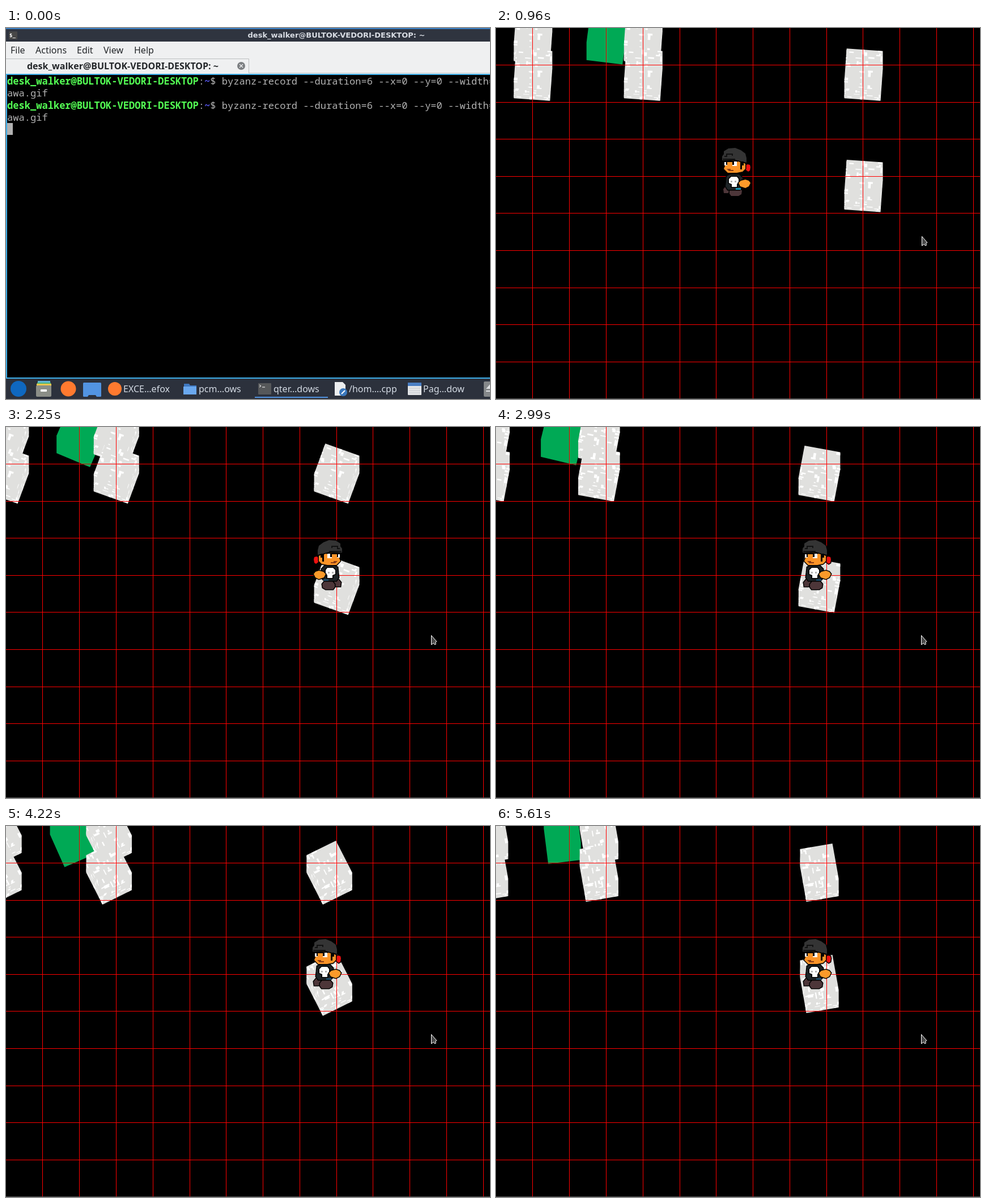
An HTML page with a canvas for the animation above (5630 ms loop, 854 by 656 pixels).

```html
<!DOCTYPE html>
<html lang="en">
<head>
<meta charset="utf-8">
<title>Terminal and tile game</title>
<style>
  html, body { margin: 0; width: 100%; height: 100%; overflow: hidden; background: #000; }
  svg, canvas { position: absolute; left: 0; top: 0; display: block; }
  text { white-space: pre; }
  .ui { font: 16px "Noto Sans", "Open Sans", sans-serif; }
  .mono { font: 17.07px "Noto Sans Mono", "DejaVu Sans Mono", monospace; fill: #b2b2b2; }
  .user { font-weight: 700; fill: #54ff54; }
  .path { font-weight: 700; fill: #5c5cff; }
</style>
</head>
<body>
<svg id="term" width="854" height="656" viewBox="0 0 854 656">
  <rect width="854" height="25" fill="#2f343f"/>
  <rect width="854" height="2" fill="#3b7fc4"/>
  <rect x="5" y="6" width="15" height="14" rx="1" fill="#474747"/>
  <text x="6" y="16" font-size="9" font-weight="700" font-family="DejaVu Sans Mono, monospace" fill="#fff">$_</text>
  <text x="583" y="17" text-anchor="middle" font-size="13" font-weight="700" font-family="DejaVu Sans, sans-serif" fill="#d8dce3">desk_walker@BULTOK-VEDORI-DESKTOP: ~</text>
  <rect y="24" width="854" height="58" fill="#eff0f1"/>
  <g class="ui" fill="#232629">
    <text x="8" y="45">File</text>
    <text x="52" y="45">Actions</text>
    <text x="125" y="45">Edit</text>
    <text x="172" y="45">View</text>
    <text x="226" y="45">Help</text>
  </g>
  <path id="keys" d="M9 47.5h8M52 47.5h10M126 47.5h8M172 47.5h9M227 47.5h10" stroke="#232629"/>
  <path d="M428.5 80V54.5H0" fill="none" stroke="#bcbebf"/>
  <path d="M429 79.5H854" stroke="#c8cacb"/>
  <text class="ui" x="206" y="73" text-anchor="middle" style="font-weight:700" fill="#232629">desk_walker@BULTOK-VEDORI-DESKTOP: ~</text>
  <circle cx="415" cy="67" r="7" fill="#7b7e81"/>
  <path d="M412 64l6 6m0-6l-6 6" stroke="#eff0f1" stroke-width="1.4"/>
  <rect y="81" width="854" height="539" fill="#3daee9"/>
  <rect x="2" y="83" width="852" height="535" fill="#000"/>
  <g id="lines" class="mono"></g>
  <rect x="2" y="168" width="10" height="21" fill="#b2b2b2"/>
</svg>

<canvas id="game" width="854" height="656"></canvas>

<svg id="bar" width="854" height="656" viewBox="0 0 854 656">
  <rect y="620" width="854" height="36" fill="#2c313c"/>
  <rect id="active" x="439" y="652" width="129" height="2" fill="#5294e2"/>
  <circle cx="22" cy="638" r="14" fill="#0f68c0"/>
  <path d="M55 627h24v6H55z" fill="#4fb477"/>
  <path d="M56 624h22v3H56z" fill="#61b8d8"/>
  <path d="M54 629h26v4H54z" fill="#f0c84c"/>
  <rect x="53" y="632" width="27" height="20" rx="2" fill="#8b8e87"/>
  <rect x="61" y="639" width="11" height="4" rx="1" fill="#fff"/>
  <circle cx="110" cy="638" r="13.5" fill="#ff7a2f"/>
  <rect x="136" y="627" width="32" height="25" rx="1.5" fill="#5294e2"/>
  <path d="M144 652l2-3h12l2 3z" fill="#2c313c"/>
  <circle cx="192" cy="638" r="12" fill="#ff7a2f"/>
  <path d="M314 629h9l2 3h11v16h-22z" fill="#3f78c0"/>
  <path d="M313 634h23v14h-23z" fill="#6aa8ee"/>
  <rect x="445" y="628" width="23" height="20" rx="1" fill="#56585a"/>
  <path d="M447 631l3 2-3 2m5 0h5" fill="none" stroke="#fff"/>
  <path d="M580 626h14l5 5v19h-19z" fill="#eceeef"/>
  <circle cx="595" cy="644" r="7" fill="#3a78bd"/>
  <path d="M592 647l6-6" stroke="#fff" stroke-width="2"/>
  <rect x="709" y="627" width="24" height="22" rx="1" fill="#e4e6e8"/>
  <path d="M709 627h24v6h-24z" fill="#4a7fc4"/>
  <path d="M711 637h20m-20 4h20m-20 4h20" stroke="#c3c8cd"/>
  <rect x="843" y="625" width="14" height="27" rx="2" fill="#85888a"/>
  <path d="M847 638l7-8v8zm0 3h7v2h-7z" fill="#dfe1e3"/>
  <g class="ui" fill="#d3dae3">
    <text x="207" y="644">EXCE…efox</text>
    <text x="340" y="644">pcm…ows</text>
    <text x="472" y="644">qter…dows</text>
    <text x="605" y="644">/hom….cpp</text>
    <text x="736" y="644">Pag…dow</text>
  </g>
</svg>

<script>
const LOOP = 5630;
const $ = id => document.getElementById(id);
const ctx = $('game').getContext('2d');

const prompt = y => `<text x="2" y="${y}"><tspan class="user">desk_walker@BULTOK-VEDORI-DESKTOP</tspan>:` +
  `<tspan class="path">~</tspan>$ byzanz-record --duration=6 --x=0 --y=0 --width=</text>` +
  `<text x="2" y="${y + 21}">awa.gif</text>`;
$('lines').innerHTML = prompt(100) + prompt(142.5);

// Refresh times: [first, last, count]
const REFRESH = [[70, 70, 1], [290, 290, 1], [410, 410, 1], [510, 780, 4], [870, 1390, 7],
  [1480, 1990, 7], [2080, 2580, 7], [2670, 3230, 8], [3310, 3800, 7], [3880, 4380, 7],
  [4460, 4860, 6], [5030, 5530, 7], [5610, 5610, 1]];
const TICKS = REFRESH.flatMap(([a, b, n]) =>
  Array.from({ length: n }, (_, i) => Math.round((a + (b - a) * i / Math.max(1, n - 1)) / 10) * 10));

// Motion keys: [time, value]
const SPIN = [[290, 10], [410, -23], [1480, -320.5], [2250, -520], [3720, -896.4], [4700, -1137], [5610, -1360]];
const SCROLL = [[1700, 0], [1990, 65], [2340, 65], [2420, 78]];
const HERO_X = [[1000, 420], [1480, 525], [1700, 572], [2420, 572], [2500, 562]];
const HERO_Y = [[1000, 212], [1480, 211], [1700, 211], [1780, 200]];

function track(keys, t) {
  if (t <= keys[0][0]) return keys[0][1];
  for (let i = 1; i < keys.length; i++) {
    const [a, va] = keys[i - 1], [b, vb] = keys[i];
    if (t <= b) return va + (vb - va) * (t - a) / (b - a);
  }
  return keys[keys.length - 1][1];
}

// Grid
const CELL_W = 64.79, CELL_H = 65.58;
function grid() {
  ctx.fillStyle = '#f00';
  for (let k = 1; k < 10; k++) ctx.fillRect(0, Math.floor(k * CELL_H), 854, 1);
  for (let k = 1; k < 14; k++) ctx.fillRect(Math.floor(k * CELL_W + 0.06), 0, 1, 656);
  ctx.fillStyle = '#555';
  ctx.fillRect(0, 655, 854, 1);
}

// Blocks
let seed = 11;
const rnd = () => (seed = seed * 16807 % 2147483647) / 2147483647;
const SPECKS = Array.from({ length: 26 }, () => {
  const long = 0.05 + rnd() * 0.14, thin = 0.03 + rnd() * 0.05;
  return rnd() < 0.65 ? [rnd(), rnd(), long, thin] : [rnd(), rnd(), thin, long];
});
const LONG = 64, WIDE = 58, TALL = 31, TILT = 0.985;
// Column, row, green
const BLOCKS = [[0, -1], [3, 0, true], [1, 0], [4, 0], [1, 1], [4, 1], [10, 1], [10, 4]];

function specks(ux, uy, vx, vy, x, y) {
  ctx.save();
  ctx.transform(ux, uy, vx, vy, x, y);
  for (const s of SPECKS) ctx.fillRect(...s);
  ctx.restore();
}

function block(x, y, deg, green) {
  const a = deg * Math.PI / 180, cos = Math.cos(a), sin = Math.sin(a);
  const u = [LONG * cos, TILT * LONG * sin], v = [-WIDE * sin, TILT * WIDE * cos];
  const top = [[-1, -1], [1, -1], [1, 1], [-1, 1]].map(([p, q]) =>
    [x + (p * u[0] + q * v[0]) / 2, y - TALL / 2 + (p * u[1] + q * v[1]) / 2]);
  let left = 0;
  top.forEach((c, i) => { if (c[0] < top[left][0]) left = i; });
  const c = top.map((_, i) => top[(left + i) % 4]);
  const low = p => [p[0], p[1] + TALL];
  const hull = [c[0], c[1], c[2], low(c[2]), low(c[3]), low(c[0])];

  ctx.save();
  ctx.beginPath();
  hull.forEach(p => ctx.lineTo(...p));
  ctx.closePath();
  ctx.fillStyle = green ? '#00a955' : '#e0e0de';
  ctx.fill();
  if (!green) {
    ctx.clip();
    ctx.fillStyle = '#fff';
    specks(...u, ...v, ...top[0]);
    for (const [p, q] of [[c[2], c[3]], [c[3], c[0]]])
      specks(q[0] - p[0], q[1] - p[1], 0, TALL, ...p);
  }
  ctx.restore();
}

// Hero, facing left
const shape = ([color, d]) => [color, new Path2D(d)];
const LEGS = [
  ['#4d3639', 'M3 75l4-5h8v10l-4 2h-7z'],
  ['#4d3639', 'M14 78l4-5h14l4 5-1 6-5 3H17l-3-4z']
].map(shape);
const TORSO = [
  ['#1d2326', 'M9 48l6-3h16l6 6v16l-5 5H11l-4-6 1-8z'],
  ['#fff', 'M13 53l4-4h10l3 4v6l-3 3v5h-9v-5l-5-2z'],
  ['#fb9a2a', 'M30 60l4-4 8-2 6 2 3 4-3 6-6 3-9-3z']
].map(shape);
const HEAD = [
  ['#ee1111', 'M42 31l4-2 4 1 1 4-1 6-3 2-5-4z'],
  ['#fb9428', 'M5 25l16-3 15 3 6 3v9l-5 5-10 2H11l-7-7 2-5z'],
  ['#343434', 'M1 22v-7l3-4V6l8-5 12-1 10 4 8 6 2 8v8l-9-2-11-3z']
].map(shape);
const FACE = [
  ['#000', 'M33 24h6v7h-3v7h-3zM5 23h23v2H5z'],
  ['#fff', 'M5 25h5v6H5zM19 24h8v8h-8z'],
  ['#000', 'M8 25h2v5H8zM19 24h3v6h-3z'],
  ['#8c3d16', 'M9 37h7v2h5v2H13z'],
  ['#111', 'M5 14h3v-4h12v4h-2v-2H10v4H5zM2 19h22v2H2z']
].map(shape);
const SKULL_EYES = new Path2D('M16 56h3v3h-3zM23 56h3v3h-3z');

function paint(parts, outline) {
  for (const [color, path] of parts) {
    if (outline) ctx.stroke(path);
    ctx.fillStyle = color;
    ctx.fill(path);
  }
}

function hero(x, y, facingRight) {
  const walking = y > 205, shift = walking ? 2 : 0;
  ctx.save();
  ctx.translate(Math.round(x), Math.round(y));
  if (facingRight) ctx.scale(-1, 1);
  ctx.translate(-22, 0);
  ctx.strokeStyle = '#000';
  ctx.lineWidth = 3;
  ctx.translate(0, -shift);
  paint(LEGS, true);
  ctx.translate(0, 2 * shift);
  paint(TORSO, true);
  ctx.fillStyle = '#b5b5b5';
  ctx.fill(SKULL_EYES);
  ctx.fillStyle = walking ? '#1795b4' : '#1d4a68';
  ctx.fillRect(25, 69, 9, 3);
  ctx.translate(0, -shift);
  paint(HEAD, true);
  paint(FACE);
  ctx.restore();
}

const ARROW = new Path2D('M.5.5V17L4.5 14l2 3 2-1-1-3.5 2.5-1z');
function pointer(x, y) {
  ctx.save();
  ctx.translate(x, y);
  ctx.fillStyle = '#4a4a4a';
  ctx.fill(ARROW);
  ctx.strokeStyle = '#fff';
  ctx.stroke(ARROW);
  ctx.restore();
}

function drawGame(t) {
  ctx.fillStyle = '#000';
  ctx.fillRect(0, 0, 854, 656);
  const spin = track(SPIN, t), scroll = track(SCROLL, t);
  for (const [col, row, green] of BLOCKS)
    block(col * 64.8 + 0.6 - scroll, 16.8 + row * 65.6, spin + (green ? 3 : 0), green);
  grid();
  hero(track(HERO_X, t), track(HERO_Y, t), t >= 1000 && t < 2430);
  pointer(t < 1740 ? 751 : 750, 368);
}

function render(now) {
  const time = now % LOOP;
  const t = TICKS.reduce((last, tick) => tick <= time ? tick : last, 0);
  const playing = t >= 290;
  $('keys').style.display = t >= 70 ? '' : 'none';
  $('game').style.display = playing ? '' : 'none';
  $('active').style.display = playing ? 'none' : '';
  $('bar').style.display = t < 600 ? '' : 'none';
  if (playing) drawGame(t);
}

const start = performance.now();
function loop() {
  render(performance.now() - start);
  requestAnimationFrame(loop);
}
loop();
</script>
</body>
</html>
```
